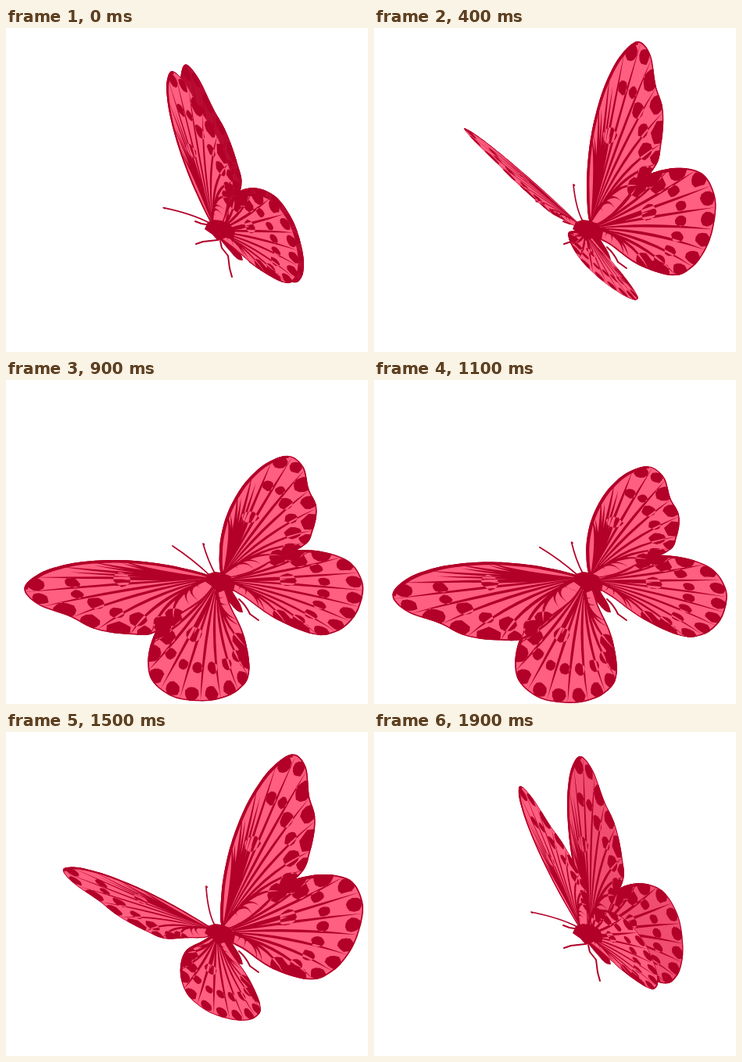
An HTML page for the animation above (2 s loop, 463x414 px).

```html
<!DOCTYPE html>
<html lang="en">
<head>
<meta charset="utf-8">
<title>Butterfly</title>
<style>
  html, body { margin: 0; width: 100%; height: 100%; overflow: hidden; background: #fff; }
  svg { display: block; width: 463px; height: 414px; }
</style>
</head>
<body>
<svg id="stage" viewBox="0 0 463 414" xmlns="http://www.w3.org/2000/svg"></svg>
<script>
const LOOP = 2000, STEP = 100, OPEN_AT = 1027, SWING = Math.PI * 5 / 6;
const DARK = '#b20029', LIGHT = '#ff5f80';

let seed = 7;
const rand = () => (seed = (seed * 16807) % 2147483647) / 2147483647;
const mix = (p, q, k) => [p[0] + (q[0] - p[0]) * k, p[1] + (q[1] - p[1]) * k];
const dist = (p, q) => Math.hypot(q[0] - p[0], q[1] - p[1]);
const clamp = v => Math.max(0, Math.min(1, v));
const fix = p => p.map(v => v.toFixed(1)).join(' ');
const el = id => document.getElementById(id);

// Point on the closed smooth curve through pts, s counted in points
function edge(pts, s) {
  const n = pts.length, i = Math.floor(s), k = s - i;
  const [a, b, c, d] = [-1, 0, 1, 2].map(j => pts[(i + j + n) % n]);
  return [0, 1].map(x => b[x] + k / 2 * (c[x] - a[x] + k * (2 * a[x] - 5 * b[x] + 4 * c[x] - d[x]
    + k * (3 * (b[x] - c[x]) + d[x] - a[x]))));
}

function trace(pts, to) {
  let d = '';
  for (let s = 0; s <= to; s += 0.125) d += (s ? 'L' : 'M') + fix(edge(pts, s));
  return d;
}

// Leaf-shaped vein, pointed at both ends
function vein(from, to, bend, width) {
  const len = dist(from, to);
  const nx = (from[1] - to[1]) / len * width, ny = (to[0] - from[0]) / len * width;
  const c = mix(mix(from, to, 0.5), bend, 0.35);
  return `M${fix(from)}Q${fix([c[0] + nx, c[1] + ny])} ${fix(to)}Q${fix([c[0] - nx, c[1] - ny])} ${fix(from)}`;
}

function spot(at, rx, ry, angle) {
  const pts = [];
  for (let i = 0; i < 11; i++) {
    const a = i / 11 * 2 * Math.PI, k = 0.9 + 0.25 * rand();
    const x = rx * k * Math.cos(a), y = ry * k * Math.sin(a);
    pts.push(fix([at[0] + x * Math.cos(angle) - y * Math.sin(angle),
      at[1] + x * Math.sin(angle) + y * Math.cos(angle)]));
  }
  return `M${pts.join('L')}Z`;
}

// Outline runs from the root along the leading edge, round the tip and back
const fore = {
  pts: [[277, 250], [276, 208], [284, 165], [298, 125], [318, 87], [345, 54], [375, 37],
    [393, 54], [397, 90], [405, 122], [397, 162], [385, 187], [348, 214], [308, 243]],
  base: [[277, 250], [372, 37], [388, 186]],
  cell: [319, 147], lead: 6, veins: [2.5, 13.2, 0.93], spotted: [4.8, 11], rows: [0.75, 0.95]
};
const hind = {
  pts: [[278, 258], [311, 227], [350, 198], [400, 186], [442, 193], [460, 221],
    [458, 252], [446, 282], [424, 306], [394, 316], [345, 302], [308, 279]],
  base: [[280, 256], [400, 186], [405, 316]],
  cell: [362, 238], lead: 3, veins: [1.2, 11.4, 0.85], spotted: [2, 9.2], rows: [0.72, 0.94]
};

function wingArt(id, w) {
  const root = w.base[0], at = s => edge(w.pts, s);
  const [from, to, step] = w.veins;
  const outline = w.outline = trace(w.pts, w.pts.length) + 'Z';
  let marks = spot(w.cell, 11, 9, -0.5) + vein(root, w.cell, w.cell, 4);
  for (let s = from; s < to; s += step) {
    const end = at(s), mid = at(s + step / 2);
    marks += vein(root, end, w.cell, 3.4);
    if (s < w.spotted[0] || s > w.spotted[1]) {
      marks += vein(root, mix(root, mid, 0.85), w.cell, 3);
      continue;
    }
    const angle = Math.atan2(mid[1] - root[1], mid[0] - root[0]);
    for (const r of w.rows) {
      const half = dist(end, at(s + step)) * r * 0.32;
      marks += spot(mix(root, mid, r), half * 1.3, half, angle);
    }
  }
  return `<clipPath id="${id}Clip"><path d="${outline}"/></clipPath>
  <g id="${id}" clip-path="url(#${id}Clip)">
    <path d="${outline}" fill="${LIGHT}"/><path d="${marks}" fill="${DARK}"/>
    <g fill="none" stroke="${DARK}">
      <path d="${trace(w.pts, w.lead)}" stroke-width="8"/><path d="${outline}" stroke-width="3.5"/>
    </g>
  </g>`;
}

// Tip and rear corner at 0, 90 and 180 degrees of wing rotation
const wings = {
  rightHind: { art: 'hind', shape: hind, hinge: [280, 256],
    tip: [[381, 237], [386, 179], [280, 237]], rear: [[401, 333], [393, 316], [361, 337]] },
  rightFore: { art: 'fore', shape: fore, hinge: [277, 250],
    tip: [[332, 128], [341, 18], [162, 96]], rear: [[373, 227], [366, 176], [268, 225]] },
  leftHind: { art: 'hind', shape: hind, hinge: [270, 260],
    tip: [[184, 340], [247, 283], [337, 188]], rear: [[309, 389], [336, 346], [369, 329]] },
  leftFore: { art: 'fore', shape: fore, hinge: [265, 253],
    tip: [[27, 280], [107, 136], [247, 52]], rear: [[198, 339], [221, 241], [326, 203]] }
};

const defs = wingArt('fore', fore) + wingArt('hind', hind);
const useWing = name => `<use id="${name}" href="#${wings[name].art}"/>`;
const shade = name => `<path id="${name}Shade" d="${wings[name].shape.outline}" fill="${DARK}"/>`;

el('stage').innerHTML = `
  <defs>${defs}</defs>
  <g fill="none" stroke="${DARK}" stroke-width="2" stroke-linejoin="round" stroke-linecap="round">
    <path d="M270 271L252 273L243 276M262 252L250 250L242 247M274 272L276 281L284 291L286 307L289 318"/>
    <path d="M298 280Q307 288 312 299L323 307"/>
    <path id="feelerL" stroke-width="1.7"/><path id="feelerR" stroke-width="1.7"/>
  </g>
  ${useWing('rightHind')}${shade('rightHind')}${useWing('rightFore')}${shade('rightFore')}
  <path d="M268 256Q284 258 292 274Q302 288 303 297Q296 298 288 287Q276 274 268 262Z" fill="${DARK}"/>
  ${useWing('leftHind')}${useWing('leftFore')}
  <path d="M254 257L258 248L267 245L275 246L286 250L293 260L291 270L281 268L271 272L264 264Z" fill="${DARK}"/>`;

// Seen from the side, a rotating point runs along an ellipse
function swing([open, half, shut], turn) {
  const centre = mix(open, shut, 0.5), c = Math.cos(turn), s = Math.sin(turn);
  return centre.map((m, i) => m + (open[i] - m) * c + (half[i] - m) * s);
}

// Affine map that carries the drawn wing onto its hinge, tip and rear corner
function placeWing(name, turn, dim) {
  const { shape, hinge, tip, rear } = wings[name];
  const [o, [ax, ay], [tx, ty]] = shape.base;
  const a = ax - o[0], b = ay - o[1], c = tx - o[0], d = ty - o[1], det = a * d - b * c;
  const p = swing(tip, turn), q = swing(rear, turn);
  const [[xx, xy, x0], [yx, yy, y0]] = hinge.map((h, i) => {
    const u = p[i] - h, v = q[i] - h;
    const kx = (u * d - v * b) / det, ky = (v * a - u * c) / det;
    return [kx, ky, h - kx * o[0] - ky * o[1]];
  });
  const matrix = `matrix(${[xx, yx, xy, yy, x0, y0].map(v => v.toFixed(4)).join(' ')})`;
  el(name).setAttribute('transform', matrix);
  const cover = el(name + 'Shade');
  if (cover) {
    cover.setAttribute('transform', matrix);
    cover.setAttribute('opacity', dim);
  }
}

function placeFeeler(side, root, bend, tip) {
  el('feeler' + side).setAttribute('d', `M${root}Q${fix(bend)} ${fix(tip)}l1.5 1`);
}

function draw(t) {
  const gap = Math.abs(t - OPEN_AT), shut = Math.min(gap, LOOP - gap) / 1000;
  const dim = 0.9 * clamp((shut - 0.845) / 0.13);
  for (const name in wings) placeWing(name, shut * SWING, dim);
  const k = Math.cos(2 * Math.PI * (t + 100) / LOOP);
  const left = [207 - 6 * k, 221 + 9 * k], right = [255 + 3 * k, 200 - 9 * k];
  placeFeeler('L', '260 249', [238, (left[1] + 249) / 2 - 2], left);
  placeFeeler('R', '267 247', [258, 230], right);
}

function tick(now) {
  draw(Math.floor(now % LOOP / STEP) * STEP);
  requestAnimationFrame(tick);
}
draw(0);
requestAnimationFrame(tick);
</script>
</body>
</html>
```
